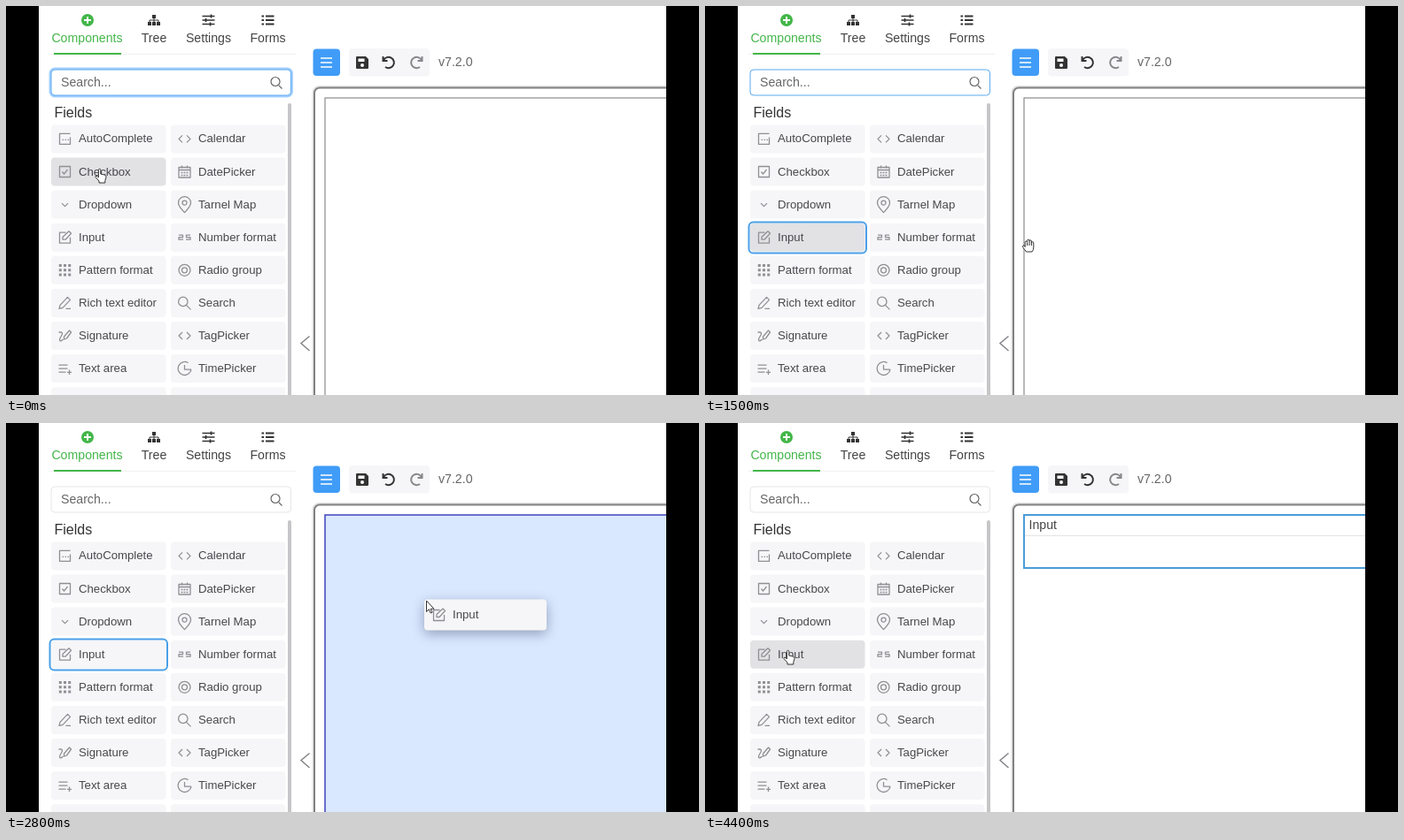
Write an HTML page that moves like this. It is 782x440 px and loops after 5000 ms.

```html
<!DOCTYPE html>
<html lang="en">
<head>
<meta charset="utf-8">
<title>Form builder</title>
<style>
html, body { margin: 0; height: 100%; overflow: hidden; background: #000; }
svg { display: block; width: 782px; height: 440px; font: 14.15px "Liberation Sans", Arial, sans-serif; }
.icon { fill: none; stroke: #909094; stroke-width: 1.3; stroke-linejoin: round; }
.label { font-size: 13.2px; fill: #48484c; }
.dark { fill: #333; stroke: none; }
#ghost rect { filter: drop-shadow(0 4px 7px rgba(30, 40, 70, .38)); }
#cursor path { fill: #fff; stroke: #333; stroke-width: 1; stroke-linejoin: round; }
</style>
</head>
<body>
<svg viewBox="0 0 782 440">
  <rect x="37" width="708" height="440" fill="#fff"/>

  <g fill="#444" text-anchor="middle">
    <text x="91.5" y="40.5" fill="#43b649">Components</text>
    <text x="167" y="40.5">Tree</text>
    <text x="228.5" y="40.5">Settings</text>
    <text x="295.5" y="40.5">Forms</text>
  </g>
  <circle cx="92" cy="16" r="7" fill="#43b649"/>
  <path d="M88 16h8M92 12v8" stroke="#fff" stroke-width="2"/>
  <g transform="translate(167 16)">
    <path class="dark" d="M-2-6h4v4h-4zM-7 2h4v4h-4zM-2 2h4v4h-4zM3 2h4v4h-4z"/>
    <path d="M0-2V2M-5 2V0H5V2" fill="none" stroke="#333"/>
  </g>
  <path d="M221.500 11.500h14M221.500 16h14M221.500 20.500h14M231.500 9.500v4M225.500 14v4M230.500 18.500v4" stroke="#333" stroke-width="1.7"/>
  <path d="M288.500 11.500h2.500M288.500 16h2.500M288.500 20.500h2.500M293 11.500h9.500M293 16h9.500M293 20.500h9.500" stroke="#333" stroke-width="2"/>
  <path d="M49 54.500H327" stroke="#f0f0f2"/>
  <path d="M54 54H130" stroke="#43b649" stroke-width="2"/>

  <rect id="glow" x="50" y="71" width="272.500" height="31" rx="5" fill="none" stroke="#a5d0ff" stroke-width="3"/>
  <rect id="search" x="51" y="72" width="270.500" height="29" rx="4" fill="#fff"/>
  <text x="62" y="91" fill="#666">Search...</text>
  <path d="M308 90l3.500 3.500M309 85.500a5 5 0 1 1-10 0a5 5 0 1 1 10 0" fill="none" stroke="#666" stroke-width="1.2"/>
  <text x="54.500" y="126" font-size="16" fill="#333">Fields</text>

  <g id="rows"></g>
  <rect id="ring" x="49.500" y="244.500" width="132.500" height="35" rx="5" fill="none" stroke="#4a9fe8" stroke-width="2"/>
  <rect x="318" y="110" width="4" height="335" rx="2" fill="#c6c6c8"/>
  <path d="M342.500 373.500L333 381.500l9.500 8.500" fill="none" stroke="#85858a" stroke-width="1.5"/>

  <rect x="346.500" y="48.500" width="30.500" height="30.500" rx="4" fill="#409cf7"/>
  <path d="M355 59h13M355 64h13M355 69h13" stroke="#fff" stroke-width="1.6"/>
  <rect x="387" y="48" width="91" height="31.500" rx="4" fill="#f6f6f8"/>
  <g transform="translate(402 64)">
    <path class="dark" d="M-7-6Q-7-7-6-7H4L7-4V6Q7 7 6 7H-6Q-7 7-7 6z"/>
    <path d="M-4.500-4.500H2.500V-1H-4.500z" fill="#fff"/>
    <circle cy="3" r="2" fill="#fff"/>
  </g>
  <g fill="none" stroke-width="2">
    <path id="undo" transform="translate(432 64)" d="M-6.500-7V-2H-1.500M-6-2.500A6.200 6.200 0 1 1-4 5" stroke="#333"/>
    <path transform="translate(463 64) scale(-1 1)" d="M-6.500-7V-2H-1.500M-6-2.500A6.200 6.200 0 1 1-4 5" stroke="#88888c"/>
  </g>
  <text x="488" y="68" fill="#666">v7.2.0</text>

  <rect x="346.500" y="91" width="460" height="400" rx="7" fill="none" stroke="#e2e2e2" stroke-width="2"/>
  <rect x="348" y="92.500" width="460" height="400" rx="6" fill="#fff" stroke="#818181" stroke-width="2"/>
  <rect id="page" x="360" y="104" width="440" height="380"/>
  <g id="field" fill="none">
    <path d="M361 127.500H745" stroke="#e4e4e6"/>
    <path id="dash" d="M360 165V440" stroke="#4a9cd8" stroke-width="2" stroke-dasharray="6 4"/>
    <rect x="360" y="104" width="440" height="60" stroke="#4a9cd8" stroke-width="2"/>
    <text x="365.500" y="119.700" fill="#444">Input</text>
  </g>
  <g id="ghost"></g>
  <g id="cursor"><path id="shape"/></g>
  <path d="M0 0H37V440H0zM745 0H782V440H745z"/>
</svg>
<script>
const $ = id => document.getElementById(id);
const ICON = {
  auto: 'M6-2V6H-6V-6H6M-3 1h1.500M0 1h1.500M3 1h1.500',
  code: 'M-2.500-4L-6.500 0L-2.500 4M2.500-4L6.500 0L2.500 4',
  check: 'M-6-6H6V6H-6zM-3 0L-1 2.500L3-2.500',
  date: 'M-6.500-5H6.500V6.500H-6.500zM-6-2H6M-3-7V-4M3-7V-4M-4 1h2M-1 1h2M2 1h2M-4 4h2M-1 4h2M2 4h2',
  down: 'M-3.500-1.500L0 2L3.500-1.500',
  pin: 'M0 9Q-7 2-7-2A7 7 0 0 1 7-2Q7 2 0 9zM2.500-2a2.500 2.500 0 1 1-5 0a2.500 2.500 0 1 1 5 0',
  edit: 'M1-5.500H-6V6.500H6V0M-2.500 2.500V-.5L4.500-7L7-4.500L.5 2.500z',
  digits: 'M-6.500-2.500h4.500V0h-4.500v2.500h5M6.500-2.500h-4.500V0h4.500v2.500h-5',
  dots: 'M-6.700-5.200H6.700M-6.700 0H6.700M-6.700 5.200H6.700',
  radio: 'M6.500 0a6.500 6.500 0 1 1-13 0a6.500 6.500 0 1 1 13 0M3 0a3 3 0 1 1-6 0a3 3 0 1 1 6 0',
  pencil: 'M-6.500 6.500L-5.500 2.500L3-6.500L6-3.500L-2.500 5.500zM1 6.500H6.500',
  lens: 'M3.500-1.500a5.200 5.200 0 1 1-10.400 0a5.200 5.200 0 1 1 10.400 0M2 2.500L7 7.500',
  sign: 'M-7-4h3q2 1 0 4t-2 5q1 2 4-1M-1 4V1L5-6L7-4L2 3z',
  area: 'M-7-4H3M-7 0H3M-7 4H1M5 1.500V7M2.500 4.200H7.500',
  clock: 'M4-6.500A7.500 7.500 0 1 0 7.500 1M0-4V1H7.500'
};
const ITEMS = [
  ['AutoComplete', 'auto'], ['Calendar', 'code'], ['Checkbox', 'check'], ['DatePicker', 'date'],
  ['Dropdown', 'down'], ['Tarnel Map', 'pin'], ['Input', 'edit'], ['Number format', 'digits'],
  ['Pattern format', 'dots'], ['Radio group', 'radio'], ['Rich text editor', 'pencil'], ['Search', 'lens'],
  ['Signature', 'sign'], ['TagPicker', 'code'], ['Text area', 'area'], ['TimePicker', 'clock'], [], []
];
const CURSOR = {
  arrow: 'M-3.500-7V5.500L-.6 2.700L1.200 7L3 6.200L1.200 2.200H5z',
  point: 'M-2.600 2V-6.500a1.200 1.200 0 0 1 2.400 0V-2L4.200-1Q6.200-.4 6 1.500L4.800 5.500V8H-2V6L-6 1.500Q-6.200-.8-4 .5z',
  grab: 'M-3.800 1.500V-3.800a1.200 1.200 0 0 1 2.400 0V-5.600a1.200 1.200 0 0 1 2.400 0V-5a1.200 1.200 0 0 1 2.400 0V-3a1.200 1.200 0 0 1 2.400 0V2Q5.800 5 4 7H-2.500Q-4 5-6.500 1.500Q-6.800-.5-5 0zM-1.400-3.500V0M1-5V0M3.400-4V0'
};
// Cursor stops: time, x, y
const STOPS = [
  [0, 107, 192], [400, 107, 262], [600, 107, 262], [800, 107, 264], [1000, 107, 264],
  [1500, 365, 271], [1600, 365, 271], [1700, 404, 271], [1800, 478, 208], [3800, 478, 208],
  [3900, 311, 224], [4400, 95, 265], [5000, 95, 265]
];
const TOP = 134.4, STEP = 37.1, ROW = 32, INPUT = 6;

function item(label, icon, x, y, w, h) {
  const extra = icon === 'dots' ? ' style="stroke-width:3;stroke-dasharray:3 2.200"' : '';
  const inset = (h - ROW) / 3;
  return `<rect x="${x}" y="${y}" width="${w}" height="${h}" rx="4" fill="#f6f6f8"/>` + (label ?
    `<path class="icon"${extra} transform="translate(${x + 15.5 + inset} ${y + h / 2})" d="${ICON[icon]}"/>
     <text class="label" x="${x + 31 + inset}" y="${y + h / 2 + 4}">${label}</text>` : '');
}

$('rows').innerHTML = ITEMS.map(([label, icon], i) =>
  item(label, icon, i % 2 ? 186 : 51, TOP + STEP * (i >> 1), 129.5, ROW)).join('');
$('ghost').innerHTML = item('Input', 'edit', 0, 0, 138, 35);
const rowBoxes = [...$('rows').querySelectorAll('rect')];

function cursorAt(t) {
  const i = STOPS.findIndex(s => s[0] > t);
  const [t0, x0, y0] = STOPS[i - 1], [t1, x1, y1] = STOPS[i];
  const k = 1 - (1 - (t - t0) / (t1 - t0)) ** 2;
  return [x0 + (x1 - x0) * k, y0 + (y1 - y0) * k];
}

function rowAt(x, y) {
  const dy = y - 7 - TOP, col = x > 186 ? 1 : 0;
  if (x > 315 || dy < 0 || dy % STEP > ROW) return -1;
  return Math.floor(dy / STEP) * 2 + col;
}

const show = (id, on) => $(id).style.display = on ? '' : 'none';

function draw(t) {
  const [x, y] = cursorAt(t);
  const held = t >= 1000 && t < 1700;
  const over = t >= 1700 && t < 2900;
  const dropped = t >= 2900;
  const hover = held ? INPUT : t >= 1700 && t < 4000 ? -1 : rowAt(x, y);
  rowBoxes.forEach((r, i) => r.setAttribute('fill', i === hover ? '#e2e2e5' : '#f6f6f8'));

  const shape = t >= 700 && t < 1700 ? 'grab' : hover >= 0 || t < 700 ? 'point' : 'arrow';
  $('shape').setAttribute('d', CURSOR[shape]);
  $('cursor').setAttribute('transform', `translate(${x} ${y})`);

  $('glow').setAttribute('opacity', Math.max(0, Math.min(1, (1500 - t) / 500)));
  $('search').setAttribute('stroke', t < 1700 ? '#5aa9ee' : '#e6e6e8');
  show('ring', held || over);

  $('page').setAttribute('fill', over ? '#d9e8ff' : '#fff');
  $('page').setAttribute('stroke', over ? '#4a4fc0' : dropped ? 'none' : '#8c8c8c');
  $('page').setAttribute('stroke-width', over ? 1.6 : 1.2);
  show('field', dropped);
  show('dash', t < 4000);
  show('ghost', over);
  $('ghost').setAttribute('transform', t < 1800 ? 'translate(467 209.500)' : 'translate(472 199.500)');
}

function tick() {
  draw(Math.floor(performance.now() % 5000 / 100) * 100);
  requestAnimationFrame(tick);
}
tick();
</script>
</body>
</html>
```
